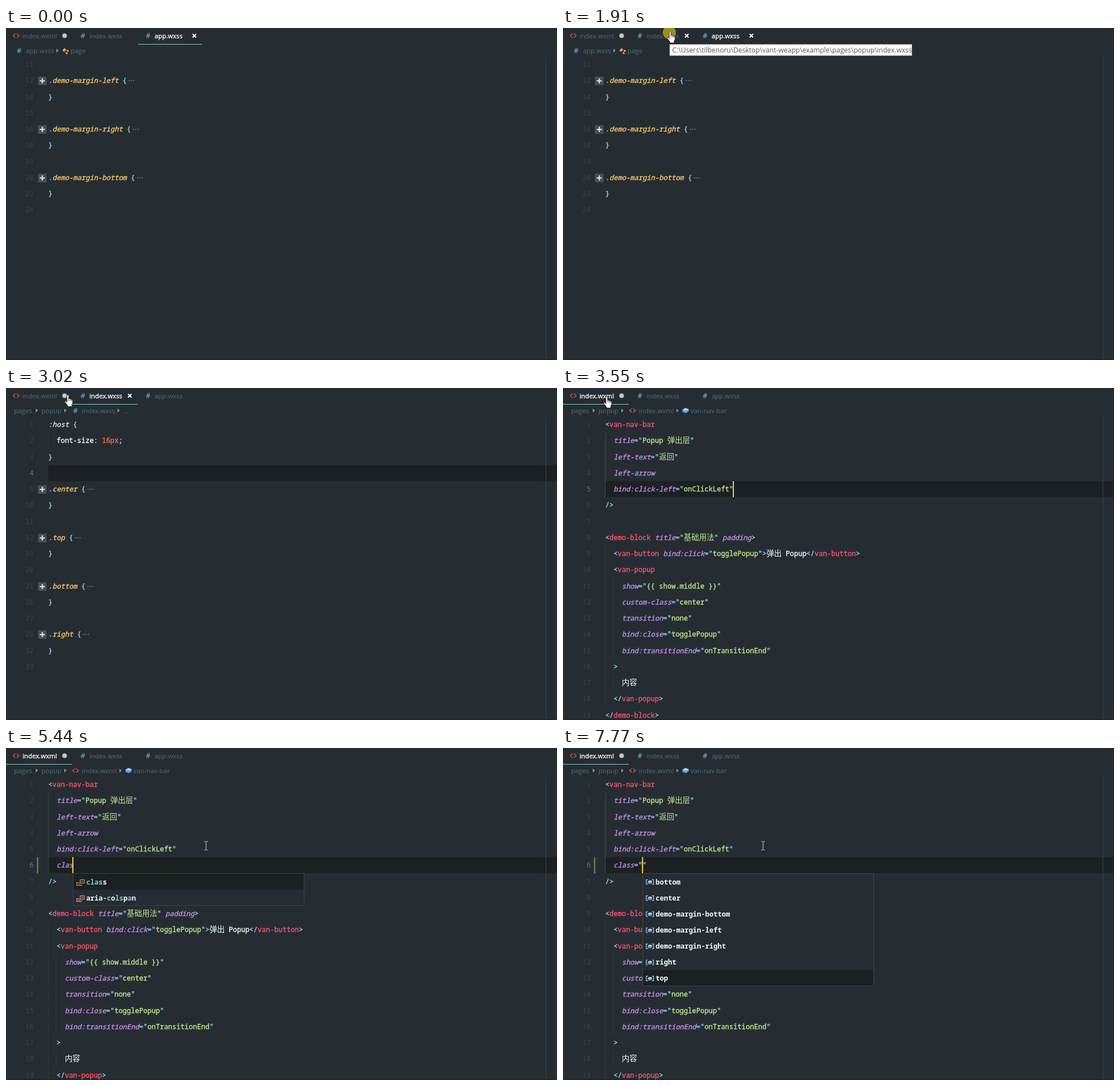
Write an HTML page with a canvas that moves like this. It is 964 px wide and 581 px high and loops after 7.92 s.

```html
<!DOCTYPE html>
<html lang="en">
<head>
<meta charset="utf-8">
<title>Editor class completion</title>
<style>
html, body { margin: 0; height: 100%; overflow: hidden; background: #252d32; }
canvas { display: block; }
</style>
</head>
<body>
<canvas id="stage" width="964" height="581"></canvas>
<script>
const ctx = document.getElementById('stage').getContext('2d');
const LOOP = 7920, LEFT = 74, TOP = 50, ROW = 28.25, CHAR = 7.23;
const C = {
  bg: '#252d32', line: '#1b2123', dim: '#546e7a', number: '#37454c', white: '#eeffff',
  cyan: '#89ddff', red: '#ff5370', purple: '#c792ea', green: '#c3e88d', yellow: '#ffcb6b',
  lilac: '#e6e4f6', orange: '#f9704f', teal: '#80cbc4', blue: '#519aba', caret: '#ffcc1a', border: '#37434a'
};
const MONO = "12.05px 'Noto Sans Mono', monospace";
const CJK = "13.3px 'Noto Sans CJK SC', sans-serif";
const ui = size => `${size}px 'Open Sans', sans-serif`;
const italics = [C.purple, C.yellow, C.lilac];

const syntax = {
  wxml: {
    rule: /(<\/?)([\w-]+)|(\/?>)([^<]*)|(")([^"]*)("?)|([\w:-]+)|(=)|([^])/g,
    colors: [C.cyan, C.red, C.cyan, C.white, C.cyan, C.green, C.cyan, C.purple, C.cyan, C.white]
  },
  wxss: {
    rule: /(\.)([\w-]+)|(:host)|(\d+px)|([{}:;])|([\w-]+|[^])/g,
    colors: [C.cyan, C.yellow, C.lilac, C.orange, C.cyan, C.white]
  }
};

const foldedRules = names => names.flatMap(name => ['', `.${name} {`, '}']);
const appFile = {
  lang: 'wxss', numbers: [11, 12, 14, 15, 16, 18, 19, 20, 23, 24],
  lines: [...foldedRules(['demo-margin-left', 'demo-margin-right', 'demo-margin-bottom']), '']
};
const styleFile = {
  lang: 'wxss', current: 3, numbers: [1, 2, 3, 4, 5, 10, 11, 12, 19, 20, 21, 26, 27, 28, 32, 33],
  lines: [':host {', '  font-size: 16px;', '}', ...foldedRules(['center', 'top', 'bottom', 'right']), '']
};
const markup = `<van-nav-bar
  title="Popup 弹出层"
  left-text="返回"
  left-arrow
  bind:click-left="onClickLeft"
/>

<demo-block title="基础用法" padding>
  <van-button bind:click="togglePopup">弹出 Popup</van-button>
  <van-popup
    show="{{ show.middle }}"
    custom-class="center"
    transition="none"
    bind:close="togglePopup"
    bind:transitionEnd="onTransitionEnd"
  >
    内容
  </van-popup>
</demo-block>`.split('\n');

const typing = [[4970, 'c'], [5120, 'cl'], [5200, 'cla'], [5440, 'clas'], [5590, 'class'], [5760, 'class='], [6140, 'class=""']];
const attributes = ['class', 'aria-colspan', 'aria-colindex', 'aria-colcount', 'aria-controls', 'aria-checked',
  'aria-current', 'aria-atomic', 'aria-describedby', 'aria-haspopup', 'aria-selected', 'aria-placeholder'];
const classNames = ['bottom', 'center', 'demo-margin-bottom', 'demo-margin-left', 'demo-margin-right', 'right', 'top'];

// Pointer moves: start, end, number of steps, target x, target y
const moves = [
  [210, 780, 8, 146, 120], [860, 990, 3, 192, 50], [1070, 1300, 4, 192, 8],
  [1450, 1450, 1, 187.5, 5], [2700, 3170, 7, 76.5, 14], [3720, 4100, 6, 350, 171]
];

const within = (t, a, b) => t >= a && t < b;
function steps(t, start, end, count) {
  if (t < start) return 0;
  if (t >= end) return 1;
  return (Math.floor((t - start) / (end - start) * (count - 1)) + 1) / count;
}

function rect(x, y, w, h, color) {
  ctx.fillStyle = color;
  ctx.fillRect(x, y, w, h);
}
function disc(x, y, r, color) {
  ctx.fillStyle = color;
  ctx.beginPath();
  ctx.arc(x, y, r, 0, 7);
  ctx.fill();
}
function stroke(d, x, y, color, width = 1) {
  ctx.save();
  ctx.translate(x, y);
  ctx.strokeStyle = color;
  ctx.lineWidth = width;
  ctx.stroke(new Path2D(d));
  ctx.restore();
}
function fill(d, x, y, color) {
  ctx.save();
  ctx.translate(x, y);
  ctx.fillStyle = color;
  ctx.fill(new Path2D(d));
  ctx.restore();
}
function text(str, x, y, color, font, heavy) {
  ctx.font = font;
  ctx.fillStyle = color;
  ctx.fillText(str, x, y);
  if (heavy) {
    ctx.strokeStyle = color;
    ctx.lineWidth = 0.35;
    ctx.strokeText(str, x, y);
  }
  return x + ctx.measureText(str).width;
}
function code(str, x, y, color) {
  const style = italics.includes(color) ? 'italic ' : '';
  for (const part of str.match(/[\u4e00-\u9fff]+|[^\u4e00-\u9fff]+/g)) {
    const cjk = part >= '\u4e00';
    x = text(part, x, y, color, style + (cjk ? CJK : MONO), !cjk);
  }
  return x;
}
function codeLine(str, y, { rule, colors }) {
  let x = LEFT;
  for (const match of str.matchAll(rule))
    match.slice(1).forEach((part, i) => { if (part) x = code(part, x, y, colors[i]); });
  return x;
}

const hash = (x, y) => text('#', x, y + 4.5, C.blue, 'bold ' + ui(12.5));
const angles = (x, y) => stroke('M4-3.5 0 0 4 3.5M6.5-3.5 10.5 0 6.5 3.5', x, y, '#e2583e', 1.3);
const cross = x => stroke('M-3-3 3 3M3-3-3 3', x, 13.5, '#fff', 2);
const arrow = x => fill('M0-3.5 4 0 0 3.5Z', x, 39.5, '#83949b');
function cube(x, y, s = 1) {
  fill(`M0 ${-s} L${5 * s} ${-4 * s} L${11 * s} ${-2 * s} V${2 * s} L${6 * s} ${5 * s} L0 ${3 * s}Z`, x, y, '#4fa3e0');
  fill(`M0 ${-s} L${5 * s} ${-4 * s} L${11 * s} ${-2 * s} L${6 * s} ${s}Z`, x, y, '#a5d8f7');
}

function drawTabs(active, hovered) {
  const tabs = [[0, 115, 'index.wxml', 29], [116, 114, 'index.wxss', 146], [231, 112, 'app.wxss', 260]];
  tabs.forEach(([x, width, name, textX], i) => {
    const on = i === active;
    if (i) hash(textX - 15.5, 13.5);
    else angles(12.5, 13.5);
    text(name, textX, 18, on ? '#fff' : C.dim, ui(11.35), on);
    if (on) rect(x, 28, width, 1, C.teal);
    if (i && (on || i === hovered)) cross(i === 1 ? 216.5 : 329.5);
  });
  disc(102.5, 13.5, 4, '#c8c8c2');
}

function drawBreadcrumb(tab, suffix) {
  const label = (str, x) => text(str, x, 44, C.dim, ui(11.45));
  if (tab === 2) {
    hash(19, 39.5);
    label('app.wxss', 35);
    arrow(88);
    fill('M0 0 4-4 7-1 3 3ZM7 0 10-1 12 2 9 3ZM5 4 8 3 10 6 7 7Z', 98.5, 39, '#ee9a4d');
    label('page', 113);
    return;
  }
  label('pages', 14);
  arrow(52);
  label('popup', 62);
  arrow(102);
  if (tab === 1) {
    hash(117.5, 39.5);
    label('index.wxss', 133);
    arrow(195);
    label('...', 205);
  } else {
    angles(116.5, 39.5);
    label('index.wxml', 133);
    arrow(198.5);
    cube(209, 39);
    label('van-nav-bar' + suffix, 223);
  }
}

function drawFold(y, end) {
  rect(56, y + 7, 15, 15, '#485053');
  rect(59, y + 13.5, 9, 2, '#e3e8e8');
  rect(62.5, y + 10, 2, 9, '#e3e8e8');
  for (let k = 0; k < 3; k++) rect(end + 3.5 + k * 4, y + 13.5, 2, 1.5, '#6f7e84');
}

function drawFile({ lang, lines, numbers, current }) {
  if (current != null) rect(LEFT, Math.round(TOP + current * ROW), 890, 28, C.line);
  rect(944, TOP, 1, 531, '#35424a');
  ctx.textAlign = 'right';
  lines.forEach((_, i) => text(numbers ? numbers[i] : i + 1, 48.5, TOP + i * ROW + 18,
    i === current ? '#607a86' : C.number, MONO));
  ctx.textAlign = 'left';
  lines.forEach((line, i) => {
    const y = TOP + i * ROW, indent = line.search(/\S|$/);
    for (let col = 0; col < indent; col += 2)
      rect(Math.round(LEFT + col * CHAR) - 0.5, y, 1, ROW, lang === 'wxml' && i < 6 ? '#3d4b52' : '#303b41');
    const end = codeLine(line, y + 18, syntax[lang]);
    if (line[0] === '.') drawFold(Math.round(y), end);
  });
}

function drawCaret(row, x) {
  rect(Math.round(x) - 1, Math.round(TOP + row * ROW), 2, 28, C.caret);
}

function drawPopup(x, items, selected, query) {
  const top = TOP + 6 * ROW + 0.5, width = 404, height = items.length * 28.1;
  rect(x, top, width, height, C.bg);
  rect(x, top + selected * 28.1, width, 28.1, C.line);
  items.forEach((item, i) => {
    const y = top + i * 28.15 + 14;
    if (query) {
      stroke('M4 0H0V5H8V3M6-5H13V1H6ZM2 2.5H6M8-2H11', x + 6.5, y + 1.5, '#d99a6c', 1.2);
    } else {
      stroke('M3-4H0V4H3M10-4H13V4H10', x + 6.5, y + 0.5, '#c5d0d4', 1.1);
      cube(x + 9, y + 0.5, 0.75);
    }
    let rest = query, textX = x + 23, start = item.indexOf('c');
    [...item].forEach((letter, k) => {
      const hit = query && k >= start && rest.includes(letter);
      if (hit) rest = rest.replace(letter, '');
      textX = text(letter, textX, y + 4.5, hit ? C.teal : C.white, 'bold ' + MONO);
    });
  });
  ctx.strokeStyle = C.border;
  ctx.lineWidth = 1;
  ctx.strokeRect(Math.round(x) + 0.5, Math.round(top) - 0.5, width, Math.round(height));
}

function drawMarkup(t) {
  const lines = [...markup];
  const typed = typing.reduce((last, [time, str]) => t >= time ? str : last, '');
  const added = t >= 4730;
  if (added) lines.splice(5, 0, '  ' + typed);
  const current = added ? 5 : 4;
  const column = added ? 2 + Math.min(typed.length, 7) : 31;
  const x = LEFT + column * CHAR;
  drawFile({ lang: 'wxml', lines, current });
  if (typed) rect(54, TOP + current * ROW, 2.5, ROW, '#647d56');
  if (!within(t, 4100, 4560) && !within(t, 6290, 6750) && !within(t, 7300, 7770)) drawCaret(current, x);
  if (t >= 6140) drawPopup(x, classNames, 6, '');
  else if (within(t, 5050, 5760)) {
    const count = t < 5120 ? 12 : t < 5200 ? 5 : t < 5440 ? 3 : t < 5590 ? 2 : 1;
    drawPopup(x, attributes.slice(0, count), 0, typed);
  }
}

function drawTooltip(alpha) {
  ctx.globalAlpha = alpha;
  rect(186, 28, 425, 21, '#767676');
  rect(187, 29, 423, 19, '#fff');
  text('C:\\Users\\tilbenoru\\Desktop\\vant-weapp\\example\\pages\\popup\\index.wxss', 191, 43, '#575757', ui(12));
  ctx.globalAlpha = 1;
}

function pointerAt(t) {
  let x = 940, y = 640;
  for (const [start, end, count, toX, toY] of moves) {
    const p = steps(t, start, end, count);
    x += (toX - x) * p;
    y += (toY - y) * p;
  }
  return [x, y];
}
function drawPointer(x, y) {
  if (y > 50) {
    stroke('M-3-7.5H-1L0-6.5 1-7.5H3M0-6.5V6.5M-3 7.5H-1L0 6.5 1 7.5H3', x, y, '#d5dadc', 1);
    return;
  }
  const hand = 'M4 1.5 5.5 0 7 1.5V7H9L9.5 8H11.5L12 9H13.5L14 10.5V15L12.5 18V21H5V19L1 14 0 11.5 1.5 11 4 13.5Z';
  fill(hand, x - 5.5, y, '#fff');
  stroke(hand, x - 5.5, y, '#111', 0.8);
  stroke('M7 7V11M9.5 8V11.5M12 9V12', x - 5.5, y, '#222', 0.8);
}

function draw(now) {
  const t = now % LOOP;
  const tab = t < 2000 ? 2 : t < 3550 ? 1 : 0;
  const [x, y] = pointerAt(t);
  rect(0, 0, 964, 581, C.bg);
  drawTabs(tab, within(t, 1220, 2000) ? 1 : -1);
  drawBreadcrumb(tab, t >= 6290 ? '.' : '');
  if (tab === 2) drawFile(appFile);
  else if (tab === 1) {
    drawFile(styleFile);
    if (!within(t, 2550, 3090)) drawCaret(3, LEFT);
  } else drawMarkup(t);
  rect(0, 580, 964, 1, '#1a2124');
  if (within(t, 1450, 2000)) drawTooltip(steps(t, 1450, 1760, 5));
  if (within(t, 1910, 2070) || within(t, 3480, 3550)) disc(x - 1.5, y + 3, 11.5, 'rgba(170,165,20,.85)');
  drawPointer(x, y);
  requestAnimationFrame(() => draw(performance.now()));
}
draw(0);
</script>
</body>
</html>
```
